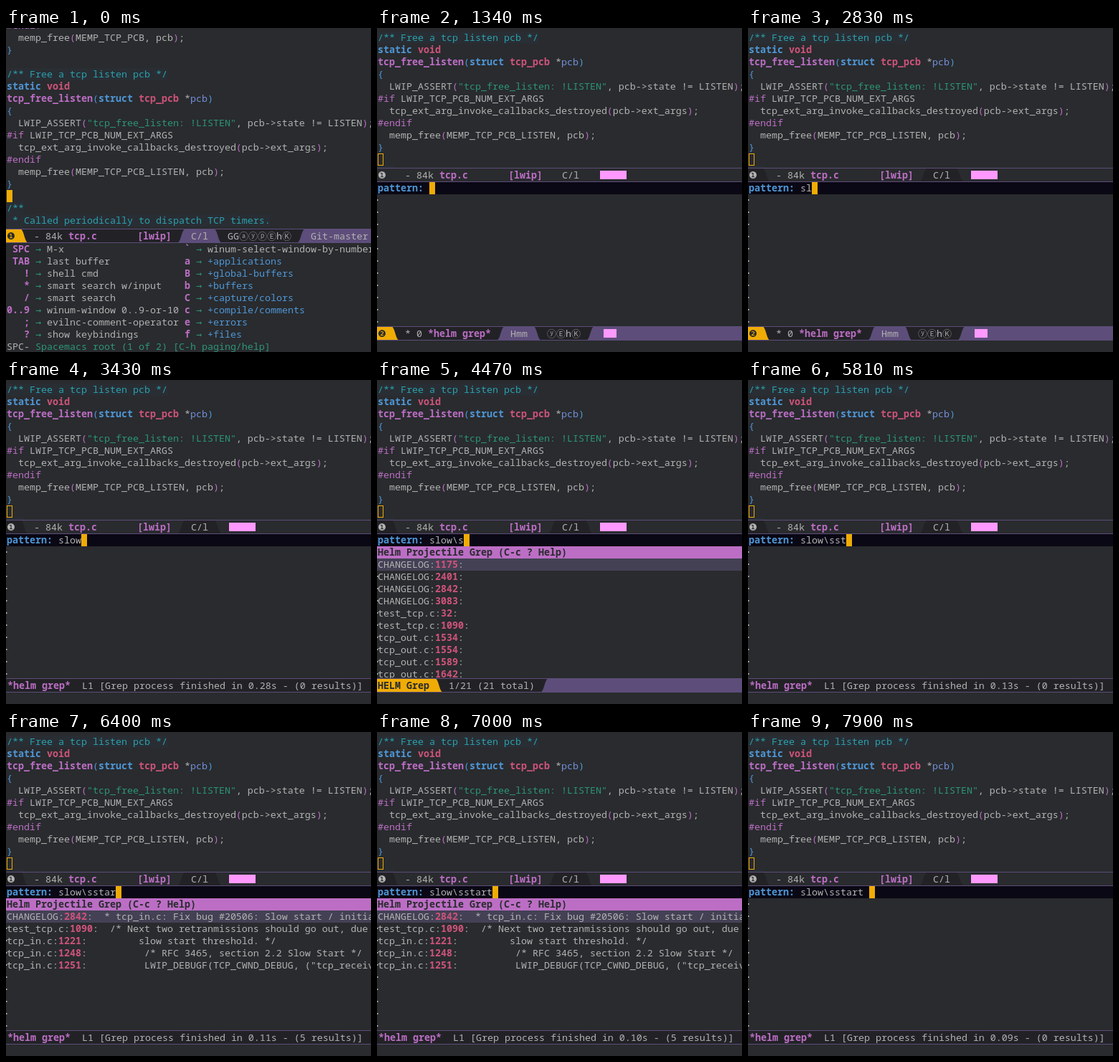
These frames come from a looping animation (509x452 px, 8000 ms). An HTML page with a canvas:

```html
<!DOCTYPE html>
<html lang="en">
<head>
<meta charset="utf-8">
<title>Helm grep</title>
<style>
html, body { margin: 0; width: 100%; height: 100%; overflow: hidden; background: #292b2e; }
canvas { display: block; }
</style>
</head>
<body>
<canvas id="stage" width="509" height="452"></canvas>
<script>
const ctx = document.getElementById('stage').getContext('2d');
const W = 509, H = 452, ROW = 17, LOOP = 8000;
const BG = '#292b2e', DARK = '#222226', PURPLE = '#5d4d7a', GOLD = '#f0ac05', PINK = '#ff99ff';
const PLAIN = '13.3333px "Noto Sans Mono", "DejaVu Sans Mono", monospace', BOLD = 'bold ' + PLAIN;
const ROUND = '13px "Noto Sans CJK JP", "DejaVu Sans", sans-serif';
const DISC = '13.3333px "DejaVu Sans", sans-serif';
const ARROW = '13.3333px "DejaVu Sans Mono", monospace';

// Text styles, switched inside a string by "§" and a letter: colour, font, background.
const STYLES = {
  n: ['#b2b2b2', PLAIN],
  k: ['#4f97d7', BOLD],
  b: ['#4f97d7', PLAIN],
  f: ['#bc6ec5', BOLD],
  p: ['#bc6ec5', PLAIN],
  t: ['#ce537a', BOLD],
  v: ['#7590db', PLAIN],
  c: ['#2aa1ae', PLAIN, '#292e34'],
  s: ['#2d9574', PLAIN],
  a: ['#2d9574', ARROW],
  d: [BG, BOLD],
  o: ['#9a9a9a', ROUND],
  r: ['#b2b2b2', DISC],
  R: [BG, DISC]
};

const CODE = [
  '§p#endif',
  '  memp_free§p(§nMEMP_TCP_PCB, pcb§p)§n;',
  '§b}',
  '',
  '§c/** Free a tcp listen pcb */',
  '§kstatic §tvoid',
  '§ftcp_free_listen§b(§kstruct §ttcp_pcb §n*§vpcb§b)',
  '§b{',
  '  LWIP_ASSERT§p(§s"tcp_free_listen: !LISTEN"§n, pcb->state != LISTEN§p)§n;',
  '§p#if §nLWIP_TCP_PCB_NUM_EXT_ARGS',
  '  tcp_ext_arg_invoke_callbacks_destroyed§p(§npcb->ext_args§p)§n;',
  '§p#endif',
  '  memp_free§p(§nMEMP_TCP_PCB_LISTEN, pcb§p)§n;',
  '§b}',
  '',
  '§c/**',
  '§c * Called periodically to dispatch TCP timers.',
  '§c */',
  '§tvoid',
  '§ftcp_tmr§b(§tvoid§b)',
  '§b{',
  '  §c/* Call tcp_fasttmr() every 250 ms */',
  '  tcp_fasttmr§p()§n;',
  '',
  '  §kif §p(§n++tcp_timer & 1§p) {'
];
const CURSOR_LINE = 14;

const KEYS = [
  ['SPC', 'M-x', '`', 'winum-select-window-by-number'],
  ['TAB', 'last buffer', 'a', '+applications'],
  ['!', 'shell cmd', 'B', '+global-buffers'],
  ['*', 'smart search w/input', 'b', '+buffers'],
  ['/', 'smart search', 'C', '+capture/colors'],
  ['0..9', 'winum-window 0..9-or-10', 'c', '+compile/comments'],
  [';', 'evilnc-comment-operator', 'e', '+errors'],
  ['?', 'show keybindings', 'f', '+files']
];

const MATCHES = [
  ['CHANGELOG', 1175, '  * tcp.c: Keep the slow timer running for open pcbs'],
  ['CHANGELOG', 2401, '  * tcp.c: Moved polling into the slow timer'],
  ['CHANGELOG', 2842, '  * tcp_in.c: Fix bug #20506: Slow start / initial congestion'],
  ['CHANGELOG', 3083, '  * tcp.c: Changed the slow timer interval'],
  ['test_tcp.c', 32, '  /* run the slow timer every second call */'],
  ['test_tcp.c', 1090, '  /* Next two retranmissions should go out, due to slow start */'],
  ['tcp_out.c', 1534, ' * Called by the slow timer to requeue segments'],
  ['tcp_out.c', 1554, '  /* the slow timer restarts output */'],
  ['tcp_out.c', 1589, ' * Called by the slow timer for one segment'],
  ['tcp_out.c', 1642, '  /* wait for the slow timer */'],
  ['tcp_in.c', 1221, '         slow start threshold. */'],
  ['tcp_in.c', 1248, '          /* RFC 3465, section 2.2 Slow Start */'],
  ['tcp_in.c', 1251, '          LWIP_DEBUGF(TCP_CWND_DEBUG, ("tcp_receive: slow start cwnd']
];

// Search steps: time, typed pattern, grep seconds, result count, still listing.
const STEPS = [
  [1340, ''], [2680, 's'], [2830, 'sl'], [2980, 'slo'], [3130, 'slow'],
  [3430, 'slow', '0.28', 0],
  [3580, 'slow', '', 21, true],
  [3720, 'slow', '0.14', 21],
  [4170, 'slow\\', '0.14', 0],
  [4470, 'slow\\s', '', 21, true],
  [4620, 'slow\\s', '0.12', 21],
  [4910, 'slow\\ss', '0.13', 0],
  [5060, 'slow\\ss', '0.12', 5],
  [5810, 'slow\\sst', '0.13', 0],
  [5960, 'slow\\sst', '0.12', 5],
  [6110, 'slow\\ssta', '0.12', 0],
  [6250, 'slow\\sstar', '0.11', 0],
  [6400, 'slow\\sstar', '0.11', 5],
  [6850, 'slow\\sstart', '0.10', 0],
  [7000, 'slow\\sstart', '0.10', 5],
  [7900, 'slow\\sstart ', '0.09', 0]
];

function box(x, y, w, h, color) {
  ctx.fillStyle = color;
  ctx.fillRect(x, y, w, h);
}

function text(x, y, str) {
  ('§n' + str).split('§').slice(1).forEach(part => {
    const run = part.slice(1), [color, font, back] = STYLES[part[0]];
    ctx.font = font;
    const width = ctx.measureText(run).width;
    if (back) box(x, y - 13, width, ROW, back);
    ctx.fillStyle = color;
    ctx.fillText(run, x, y);
    x += width;
  });
}

// Mode line: segments [left edge of the end wave, colour] over a base colour.
// Waves lean right and left in turn.
function bar(y, base, segments) {
  box(0, y, W, 20, base);
  segments.map(([x, color], i) => [x + i % 2 * 11, x + 11 - i % 2 * 11, color])
    .reverse().forEach(([top, bottom, color]) => {
      const mid = (top + bottom) / 2;
      ctx.fillStyle = color;
      ctx.beginPath();
      ctx.moveTo(0, y);
      ctx.lineTo(top, y);
      ctx.bezierCurveTo(mid, y + 2, mid, y + 18, bottom, y + 20);
      ctx.lineTo(0, y + 20);
      ctx.fill();
    });
  box(0, y, W, 1, PURPLE);
  box(0, y + 19, W, 1, PURPLE);
}

function code(first, bottom, top) {
  ctx.save();
  ctx.beginPath();
  ctx.rect(0, 0, W, bottom);
  ctx.clip();
  CODE.slice(first).forEach((line, i) => text(1, top + i * ROW + 13, line));
  ctx.restore();
}

function fileInfo(y) {
  text(39, y, '- 84k §ftcp.c       [lwip]');
  text(258, y, 'C/l');
}

function activeLine(y) {
  bar(y, PURPLE, [[20, GOLD], [239, DARK], [290, PURPLE], [406, DARK]]);
  text(1, y + 15, '§R❶');
  fileInfo(y + 15);
  text(309, y + 15, 'GG§oⓐⓨⓟⒺ§nh§oⓀ');
  text(425, y + 15, 'Git-master');
}

function fullView(t) {
  const bottom = t < 590 ? 280 : 416;
  code(0, bottom, -12);
  box(1, -12 + CURSOR_LINE * ROW, 8, ROW, GOLD);
  activeLine(bottom);
  if (t >= 590) return;
  KEYS.forEach(([key, name, key2, name2], i) => {
    const y = 313 + i * ROW;
    text(1, y, `§f${key.padStart(4)} §a→ §n${name}`);
    text(249, y, `§f${key2} §a→ §${name2[0] === '+' ? 'b' : 'n'}${name2}`);
  });
  text(1, 449, t < 140 ? 'SPC- §sSpacemacs root (1 of 2) [C-h paging/help]' : 'SPC /-');
}

function topWindow(t) {
  code(4, 195, 5);
  ctx.strokeStyle = GOLD;
  ctx.strokeRect(1.5, 175.5, 7, 16);
  bar(195, BG, t < 2680 ? [] : [[20, DARK], [239, BG], [290, DARK]]);
  text(1, 210, '§r❶');
  fileInfo(210);
  box(311, 199, 37, 12, PINK);
}

function results(pattern, bare) {
  const find = new RegExp(pattern, 'i');
  box(0, 232, W, ROW, '#bc6ec5');
  text(1, 245, '§dHelm Projectile Grep (C-c ? Help)');
  box(0, 249, W, ROW, '#444155');
  const rows = MATCHES.filter(m => find.test(m[2])).slice(0, 10);
  rows.forEach(([file, line, str], i) =>
    text(1, 262 + i * ROW, `${file}:§t${line}§n:${bare ? '' : str}`));
}

function searchLine(secs, count, bare) {
  if (secs) {
    bar(416, DARK, []);
    text(2, 431, `§f*helm grep*§n  L1 [Grep process finished in ${secs}s - (${count} results)]`);
  } else if (bare) {
    bar(416, PURPLE, [[81, GOLD], [228, DARK]]);
    text(1, 431, '§dHELM Grep');
    text(100, 431, `1/${count} (${count} total)`);
  } else {
    bar(416, PURPLE, [[20, GOLD], [167, DARK], [218, PURPLE], [292, DARK]]);
    text(1, 431, '§R❷');
    text(39, 431, '* 0 §f*helm grep*');
    text(186, 431, 'Hmm');
    text(237, 431, '§oⓨⒺ§nh§oⓀ');
    box(316, 420, 18, 12, PINK);
  }
}

function searchView(t) {
  const [, typed, secs, count, bare] = STEPS.filter(s => s[0] <= t).pop() || [0, null];
  topWindow(t);
  for (let y = 239; y < 416; y += ROW) box(0, y, 1.5, 2, '#b2b2b2');
  if (typed !== null) {
    box(0, 215, W, ROW, '#0a0814');
    text(1, 228, '§kpattern: §n' + typed);
    box(73 + typed.length * 8, 215, 8, ROW, GOLD);
  }
  if (count) results(typed, bare);
  box(0, 416, W, H - 416, BG);
  searchLine(secs, count, bare);
}

function draw(now) {
  const t = now % LOOP;
  box(0, 0, W, H, BG);
  (t < 1190 ? fullView : searchView)(t);
  requestAnimationFrame(draw);
}
requestAnimationFrame(draw);
</script>
</body>
</html>
```
